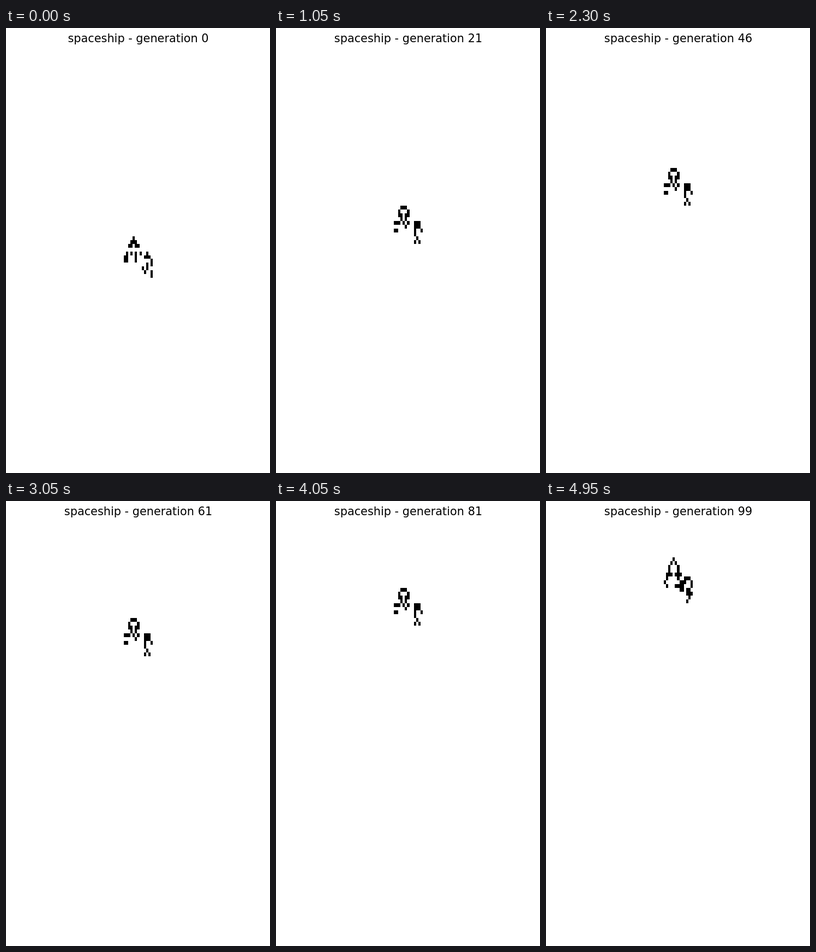
Animation of 484x814 px, one loop 5 s. Source, as an HTML page:

```html
<!DOCTYPE html>
<html lang="en">
<head>
<meta charset="utf-8">
<title>Spaceship</title>
<style>
  html, body { margin: 0; width: 100%; height: 100%; overflow: hidden; background: #fff; }
  svg { display: block; }
  text { font: 20.833px "DejaVu Sans", sans-serif; text-anchor: middle; }
  path { shape-rendering: crispEdges; }
</style>
</head>
<body>
<svg width="484" height="814">
  <text id="title" x="242.5" y="26"></text>
  <path id="cells"></path>
</svg>
<script>
const COLS = 113, ROWS = 111, PAD = 50;
const GENERATIONS = 100, STEP_MS = 50;
const edgeX = col => Math.round(10 + col * 465 / COLS);
const edgeY = row => Math.round(34 + row * 770 / ROWS);

const ship = [
  "....O",
  "...OOO",
  "..OO.OO",
  "",
  ".O.O.O.O..O",
  "OO...O...OOO",
  "OO...O......O",
  "..........O.O",
  "........O.O",
  ".........O..O",
  "............O",
];

// Live cells are stored as row * COLS + col.
function seed() {
  const live = new Set();
  ship.forEach((line, row) => [...line].forEach((mark, col) => {
    if (mark === "O") live.add((row + PAD) * COLS + col + PAD);
  }));
  return live;
}

function evolve(live) {
  const counts = new Map();
  for (const cell of live)
    for (const dy of [-COLS, 0, COLS])
      for (const dx of [-1, 0, 1])
        if (dx || dy) counts.set(cell + dy + dx, (counts.get(cell + dy + dx) || 0) + 1);
  const next = new Set();
  for (const [cell, n] of counts)
    if (n === 3 || (n === 2 && live.has(cell))) next.add(cell);
  return next;
}

function outline(live) {
  return [...live].map(cell => {
    const col = cell % COLS, row = Math.floor(cell / COLS);
    return `M${edgeX(col)} ${edgeY(row)}H${edgeX(col + 1)}V${edgeY(row + 1)}H${edgeX(col)}Z`;
  }).join("");
}

const outlines = [];
for (let live = seed(); outlines.length < GENERATIONS; live = evolve(live))
  outlines.push(outline(live));

const title = document.getElementById("title");
const cells = document.getElementById("cells");
let shown = -1;

function draw() {
  const generation = Math.floor(performance.now() / STEP_MS) % GENERATIONS;
  if (generation !== shown) {
    shown = generation;
    title.textContent = `spaceship - generation ${generation}`;
    cells.setAttribute("d", outlines[generation]);
  }
  requestAnimationFrame(draw);
}
draw();
</script>
</body>
</html>
```
